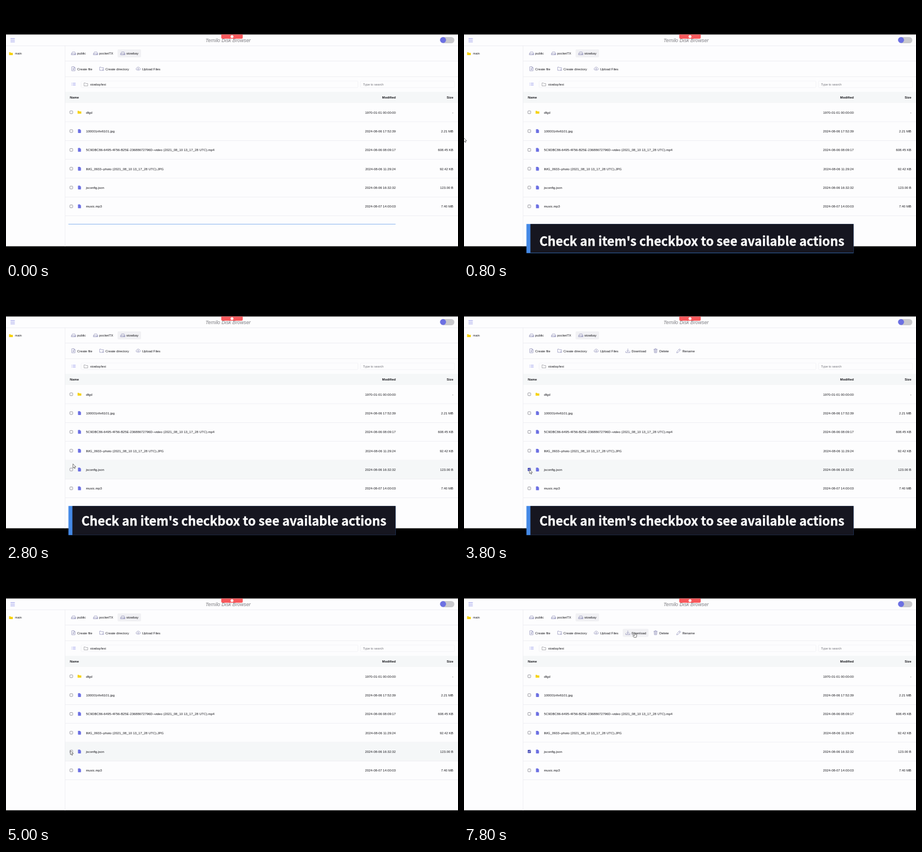
An HTML page with a canvas that plays this animation: 800x450 px, repeating every 8 s.

```html
<!DOCTYPE html>
<html lang="en">
<head>
<meta charset="utf-8">
<title>File manager</title>
<style>
  html, body { margin: 0; width: 100%; height: 100%; overflow: hidden; background: #000; }
  canvas { display: block; width: 800px; height: 450px; }
</style>
</head>
<body>
<canvas id="stage"></canvas>
<script>
const LOOP = 8000, STEP = 200;
const SANS = '"Liberation Sans", Arial, sans-serif';
const CAPTION_FONT = '"Noto Sans CJK JP", "Noto Sans CJK SC", "Noto Sans CJK", "Noto Sans", sans-serif';
const CAPTION = "Check an item's checkbox to see available actions";
const INK = '#17171c', ICON = '#7778aa', ACCENT = '#6c70e2', LINE = '#ececf1', HOVER = '#f5f7f8';
const ROW_TOP = 171.7, ROW_H = 100 / 3;

const ROWS = [
  ['dfgd', '1970-01-01 00:00:00', '-'],
  ['100001rthr6101.jpg', '2024-08-06 17:52:39', '2.21 MB'],
  ['5C9DBC86-6495-4F56-B25E-23688672796D~video (2021_08_10 13_17_28 UTC).mp4', '2024-08-06 08:09:17', '608.45 KB'],
  ['IMG_0933~photo (2021_08_10 13_17_28 UTC).JPG', '2024-08-06 11:29:24', '92.42 KB'],
  ['jsconfig.json', '2024-08-06 16:32:32', '123.00 B'],
  ['music.mp3', '2024-08-07 14:00:03', '7.40 MB']
];

// Pointer tip: time, x, y
const PATH = [
  [600, -10, 248], [800, -0.5, 234], [1200, 1, 200], [1800, 3.5, 173],
  [2400, 117, 298], [3000, 119, 317], [3200, 119, 317], [3600, 116, 322],
  [4200, 116, 322], [4800, 114, 320.5], [5600, 114, 320.5],
  [6400, 131, 182], [7600, 297, 122], [7800, 302, 110.5]
];

const canvas = document.getElementById('stage');
const ratio = window.devicePixelRatio || 1;
canvas.width = 800 * ratio;
canvas.height = 450 * ratio;
const c = canvas.getContext('2d');

const clamp = v => Math.max(0, Math.min(1, v));
const inOut = p => p < 0.5 ? 4 * p ** 3 : 1 - 4 * (1 - p) ** 3;

function rect(x, y, w, h, color) {
  c.fillStyle = color;
  c.fillRect(x, y, w, h);
}

function round(x, y, w, h, r, fill, stroke, width = 0.6) {
  c.beginPath();
  c.roundRect(x, y, w, h, r);
  if (fill) { c.fillStyle = fill; c.fill(); }
  if (stroke) { c.strokeStyle = stroke; c.lineWidth = width; c.stroke(); }
}

function dot(x, y, r, color) {
  c.beginPath();
  c.arc(x, y, r, 0, Math.PI * 2);
  c.fillStyle = color;
  c.fill();
}

// Draws an SVG path with its own origin at (x, y)
function shape(d, x, y, fill, stroke, width = 0.6) {
  const p = new Path2D(d);
  c.save();
  c.translate(x, y);
  c.lineJoin = c.lineCap = 'round';
  if (fill) { c.fillStyle = fill; c.fill(p); }
  if (stroke) { c.strokeStyle = stroke; c.lineWidth = width; c.stroke(p); }
  c.restore();
}

// y is the vertical middle of the capitals
function text(s, x, y, { size = 5.85, color = INK, align = 'left', style = '' } = {}) {
  c.font = `${style} ${size}px ${SANS}`;
  c.textAlign = align;
  c.fillStyle = color;
  c.fillText(s, x, y + size * 0.36);
}

const icons = {
  drive: 'M-3.7 .6L-2.3 -2.4H2.3L3.7 .6V2.4H-3.7ZM-3.7 .6H3.7M1.6 1.5H2.4',
  newFile: 'M-2.6 -3.6H.8L2.7 -1.7V3.6H-2.6ZM.8 -3.6V-1.7H2.7M0 -.6V2M-1.3 .7H1.3',
  newFolder: 'M3.5 -.2V-1.7H-.2L-1.1 -2.9H-3.5V2.8H1M2.6 .7V3.5M1.2 2.1H4',
  upload: 'M-1.6 2.2H-2.2A1.8 1.8 0 0 1 -2.5 -1.3A2.7 2.7 0 0 1 2.5 -1.3A1.8 1.8 0 0 1 2.2 2.2H1.6M0 3.3V-.4M-1.4 .9L0 -.5L1.4 .9',
  download: 'M-3.6 1V3.3H3.6V1M0 -3.4V1.4M-1.7 -.2L0 1.5L1.7 -.2',
  trash: 'M-3 -2.4H3M-1.1 -2.4V-3.5H1.1V-2.4M-2.4 -2.4L-2 3.5H2L2.4 -2.4M-.8 -.9V2.1M.8 -.9V2.1',
  pencil: 'M-3.4 3.4L-2.8 1L1.7 -3.4L3.4 -1.7L-1 2.8ZM.5 -2.2L2.2 -.5',
  folder: 'M-3.3 2.4V-2.5H-1L-.1 -1.5H3.3V2.4Z',
  file: 'M-2.6 -2.7Q-2.6 -3.4 -1.9 -3.4H.8L2.7 -1.5V2.7Q2.7 3.4 2 3.4H-1.9Q-2.6 3.4 -2.6 2.7Z'
};

function button(icon, ix, label, tx, y) {
  shape(icons[icon], ix, y, null, ICON);
  text(label, tx, y + 0.3);
}

function pointerAt(t) {
  if (t < PATH[0][0]) return [-20, 250];
  for (let i = 1; i < PATH.length; i++) {
    const [t0, x0, y0] = PATH[i - 1], [t1, x1, y1] = PATH[i];
    if (t <= t1) {
      const p = (t - t0) / (t1 - t0);
      const k = p * p * (3 - 2 * p);
      return [x0 + (x1 - x0) * k, y0 + (y1 - y0) * k];
    }
  }
  return PATH[PATH.length - 1].slice(1);
}

function drawHeader() {
  rect(0, 70, 800, 0.8, LINE);
  for (const y of [57.4, 60.2, 63]) rect(8, y, 7.6, 0.7, ACCENT);
  text('Ternilo Disk Browser', 393, 60.6, { size: 8.75, color: '#7d7d82', align: 'center', style: 'italic' });
  round(381, 50.5, 38, 7.5, [0, 0, 2, 2], '#f9595c');
  dot(400, 54.3, 2.5, '#fff');
  round(770, 55, 23.5, 11, 5.5, '#c9c9cd');
  dot(773.5, 60.3, 5.3, ACCENT);
}

function drawTools(active, hot) {
  round(197.5, 76.7, 41.5, 14.3, 2, '#f1f1f4');
  button('drive', 119.7, 'public', 126, 84);
  button('drive', 158.7, 'pocketTX', 165, 84);
  button('drive', 206.8, 'stowbay', 213, 84);
  rect(105, 97, 695, 0.8, LINE);

  button('newFile', 119.5, 'Create file', 126, 111.2);
  button('newFolder', 169.3, 'Create directory', 176, 111.2);
  button('upload', 234, 'Upload Files', 240.7, 111.2);
  if (active) {
    if (hot) round(281, 104.2, 45.5, 14.2, 2, '#f1f1f4');
    button('download', 290, 'Download', 296.4, 111.2);
    button('trash', 339, 'Delete', 345.7, 111.2);
    button('pencil', 380, 'Rename', 386.4, 111.2);
  }
  rect(105, 124.8, 695, 0.8, LINE);

  for (const y of [136.4, 138.5, 140.6]) {
    rect(116.2, y - 0.3, 0.9, 0.6, ACCENT);
    rect(118.2, y - 0.3, 5, 0.5, ACCENT);
  }
  round(133, 133, 490, 11.6, 1.5, null, LINE);
  shape(icons.folder, 141.4, 138.8, null, '#66666f', 0.5);
  text('stowbay/test', 149, 138.8, { size: 5 });
  round(627.3, 133, 166.5, 11.6, 1.5, null, LINE);
  text('Type to search', 632, 139, { size: 5.55, color: '#75757c' });
}

function drawCheckbox(y, on) {
  if (!on) return round(113.1, y - 2.4, 4.9, 4.9, 0.9, '#fff', '#767680', 0.7);
  round(112.8, y - 2.7, 5.5, 5.5, 0.9, '#4247b5');
  shape('M-1.6 .1L-.5 1.2L1.6 -1.3', 115.6, y, null, '#fff', 0.9);
}

function drawTable(px, py, checked) {
  rect(105, 152, 695, 19.7, HOVER);
  text('Name', 113, 162, { style: 'bold' });
  text('Modified', 689.8, 162, { style: 'bold', align: 'right' });
  text('Size', 791.7, 162, { style: 'bold', align: 'right' });

  ROWS.forEach(([name, date, size], i) => {
    const top = ROW_TOP + i * ROW_H, y = top + 16.5;
    if (px > 105 && py >= top && py < top + ROW_H) rect(105, top, 695, ROW_H, HOVER);
    rect(105, top + ROW_H - 0.4, 695, 0.8, LINE);
    drawCheckbox(y, i === 4 && checked);
    if (i) shape(icons.file, 130, y + 0.1, ACCENT);
    else shape(icons.folder, 130, y + 0.1, '#f6d210');
    text(name, 141.5, y + 0.2);
    text(date, 689.8, y + 0.2, { align: 'right' });
    text(size, 791.7, y + 0.2, { align: 'right' });
  });
}

c.font = `700 22px ${CAPTION_FONT}`;
const captionSize = 22 * 540 / c.measureText(CAPTION).width;

// s runs forwards on entry and backwards on exit
function drawCaption(s) {
  const x = 110.5, y = 386.2, w = 579, h = 51.6;
  const blue = h * inOut(clamp((s + 80) / 560));
  const dark = h * inOut(clamp((s - 30) / 900));
  if (blue < 0.3) return;
  rect(x, y, w, blue, '#4489e6');
  if (dark < 0.3) return;
  rect(x + 7, y, w - 7, dark, '#161620');
  c.save();
  c.beginPath();
  c.rect(x + 7, y, w - 7, dark);
  c.clip();
  c.font = `700 ${captionSize}px ${CAPTION_FONT}`;
  c.textAlign = 'left';
  c.fillStyle = c.strokeStyle = '#fff';
  c.lineWidth = 0.35;
  c.lineJoin = 'round';
  const base = 421.2 + 38 * (1 - clamp((s - 300) / 900)) ** 3;
  c.fillText(CAPTION, 133.5, base);
  c.strokeText(CAPTION, 133.5, base);
  c.restore();
}

function drawPointer(x, y, hand) {
  const d = hand
    ? 'M-.8 .6Q0 -.5 .8 .6V3.4L3.2 4Q4 4.3 3.8 5.4L3 8.8H-1.2L-3.2 5.8Q-2.8 4.6 -1.7 5.3L-.8 6Z'
    : 'M0 0V6.7L1.6 5.3L2.7 7.8L3.9 7.3L2.8 4.8H4.9Z';
  shape(d, x, y, '#fff', '#333', 0.65);
}

function draw(t) {
  c.setTransform(ratio, 0, 0, ratio, 0, 0);
  const [px, py] = pointerAt(t);
  const checked = (t >= 3600 && t < 4800) || t >= 5600;
  const hot = checked && px > 281 && px < 326.5 && py > 104 && py < 118.4;

  rect(0, 0, 800, 450, '#000');
  rect(0, 50.5, 800, 375.2, '#fdfdfe');
  drawHeader();
  rect(104, 70, 0.8, 355.7, LINE);
  shape(icons.folder, 8.8, 84.6, '#f6d210');
  text('main', 16, 84.3, { size: 5.42 });
  drawTools(checked, hot);
  drawTable(px, py, checked);
  drawCaption(t < 3000 ? t : 4900 - t);
  drawPointer(px, py, hot);
}

const start = performance.now();
function tick(now) {
  const t = Math.max(0, now - start) % LOOP;
  draw(Math.floor(t / STEP) * STEP);
  requestAnimationFrame(tick);
}
draw(0);
requestAnimationFrame(tick);
</script>
</body>
</html>
```
